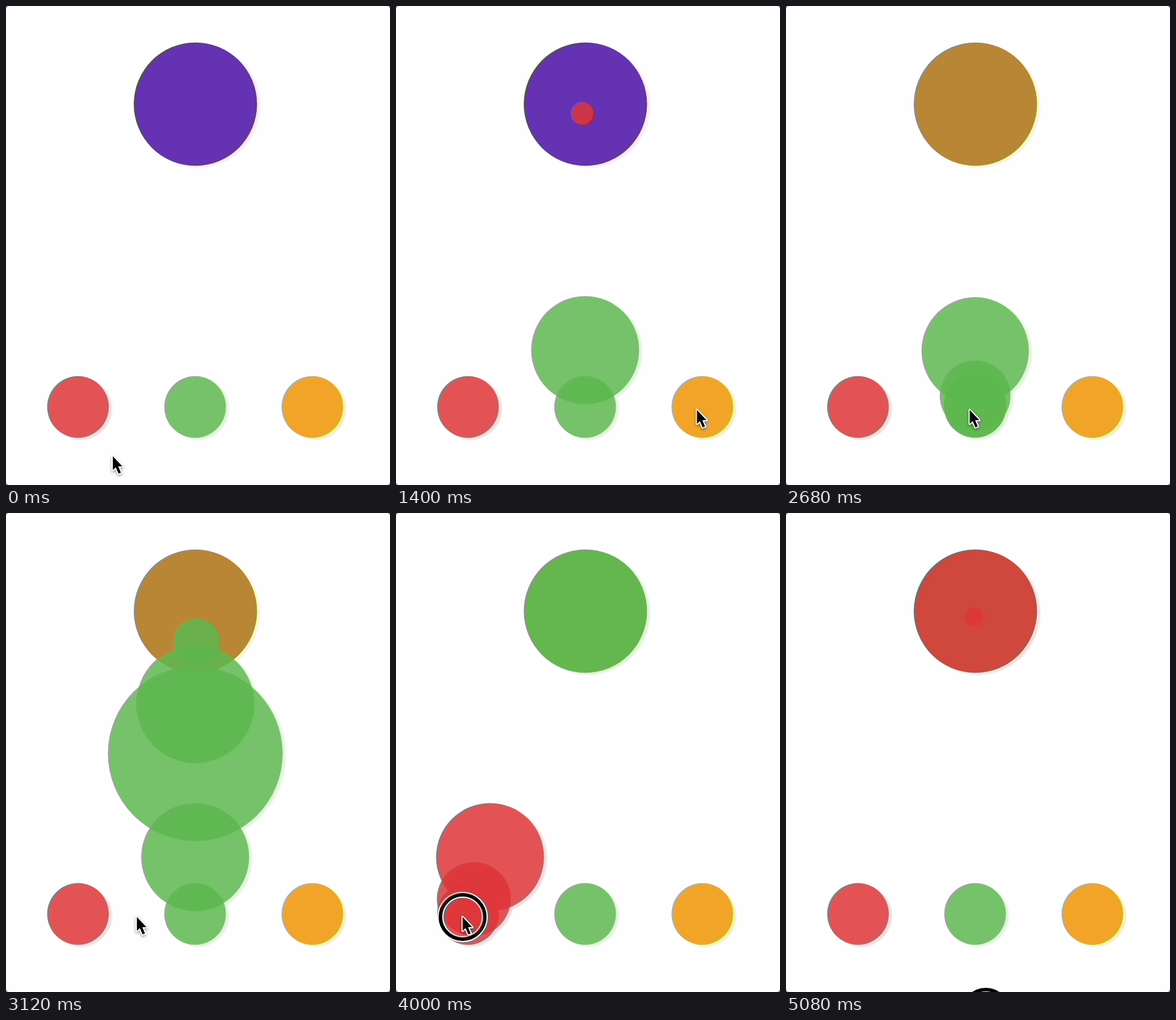
Recreate the animation shown at these times as an HTML page. Size 640 px wide and 798 px high, loop 5120 ms.

```html
<!DOCTYPE html>
<html>
<head>
<meta charset="utf-8">
<style>
  html, body { margin: 0; width: 100%; height: 100%; overflow: hidden; background: #777; }
  #stage { position: absolute; left: 0; top: 0; width: 640px; height: 798px; overflow: hidden; border-radius: 5px; }
  svg { position: absolute; left: -20px; top: -20px; }
</style>
</head>
<body>
<div id="stage">
  <svg width="680" height="838" viewBox="-20 -20 680 838">
    <!-- Brightness stays in place while the colour is shifted to the lower right. -->
    <filter id="colorShift" filterUnits="userSpaceOnUse" x="-20" y="-20" width="680" height="838"
      color-interpolation-filters="sRGB">
      <feColorMatrix in="SourceGraphic" result="luma"
        values=".299 .587 .114 0 0  .299 .587 .114 0 0  .299 .587 .114 0 0  0 0 0 1 0"/>
      <feColorMatrix in="SourceGraphic"
        values=".3505 -.2935 -.057 0 .5  -.1495 .2065 -.057 0 .5  -.1495 -.2935 .443 0 .5  0 0 0 1 0"/>
      <feGaussianBlur stdDeviation="1.5"/>
      <feOffset dx="4.5" dy="3" result="chroma"/>
      <feComposite in="luma" in2="chroma" operator="arithmetic" k2="1" k3="2" k4="-1.004"/>
    </filter>
    <g filter="url(#colorShift)">
      <rect x="-20" y="-20" width="680" height="838" fill="#fefefe"/>
      <g id="discs"></g>
      <g id="pointer">
        <g id="ring" fill="none">
          <circle r="37" stroke="#fff" stroke-width="10"/>
          <circle r="37" stroke="#000" stroke-width="6"/>
        </g>
        <path d="M0 0V23L5 18.5L9.5 29L13.5 27.5L9 17H16Z" stroke="#fff" stroke-width="4"
          paint-order="stroke" stroke-linejoin="round" style="filter:drop-shadow(0 2px 2px #0006)"/>
      </g>
    </g>
  </svg>
</div>
<script>
const LOOP = 5120, STEP = 40;
const FLIGHT = 930;            // travel time of a ball
const PRESS = 95, LEAD = 280;  // button held before release, pointer waiting before first tap
const ALPHA = 0.85, RADIUS = 51.4;
const PURPLE = [100, 50, 178];
const TARGET = { x: 315.7, y: 163.5 };

const makeButton = (x, color) => ({ x, y: 668, color });
const red = makeButton(120, [224, 55, 58]);
const green = makeButton(315.2, [94, 185, 80]);
const orange = makeButton(510.6, [241, 150, 4]);

const visit = (button, ...taps) => ({ x: button.x - 9, y: button.y + 5, taps, button });
const stops = [
  { x: 178, y: 750, taps: [0] },
  visit(red, 584),
  visit(green, 1115),
  visit(orange, 1683),
  visit(green, 2397, 2554, 2641, 2835),
  visit(red, 3715, 3854, 4059, 4238),
  { x: 150, y: 860, taps: [4840] },
  { x: 333, y: 831, taps: [5150] },
];

const discs = document.getElementById('discs');
const pointer = document.getElementById('pointer');
const ring = document.getElementById('ring');

function addDisc({ x, y }, r, color, alpha) {
  const el = document.createElementNS('http://www.w3.org/2000/svg', 'circle');
  discs.append(el);
  el.setAttribute('fill', `rgb(${color})`);
  el.setAttribute('fill-opacity', alpha);
  place(el, x, y, r);
  return el;
}

function place(el, x, y, r) {
  el.setAttribute('cx', x);
  el.setAttribute('cy', y);
  el.setAttribute('r', r);
}

const mixer = addDisc(TARGET, RADIUS * 2, PURPLE, 1);
for (const b of [red, green, orange]) addDisc(b, RADIUS, b.color, ALPHA);
const balls = stops.filter(s => s.button).flatMap(({ button, taps }) =>
  taps.map(at => ({ at, button, el: addDisc(button, RADIUS, button.color, ALPHA) })));

const clamp = v => Math.max(0, Math.min(1, v));
const lerp = (a, b, k) => a + (b - a) * k;
const easeInOut = u => u < 0.5 ? 2 * u * u : 1 - 2 * (1 - u) ** 2;
const show = (el, visible) => el.setAttribute('visibility', visible ? 'visible' : 'hidden');

function drawBalls(t) {
  let mixed = PURPLE;
  for (const { at, button, el } of balls) {
    const u = (t - at) / FLIGHT;
    show(el, u >= 0 && u < 1);
    const p = easeInOut(clamp(u));
    const scale = p < 0.5 ? lerp(1, 3, p * 2) : lerp(3, 0.2, p * 2 - 1);
    place(el, lerp(button.x, TARGET.x, p), lerp(button.y, TARGET.y, p), RADIUS * scale);
    // Every arriving ball blends half of its colour into the big disc.
    if (u >= 1) mixed = mixed.map((c, i) => (c + button.color[i]) / 2);
  }
  mixer.setAttribute('fill', `rgb(${mixed.map(Math.round)})`);
}

function drawPointer(t) {
  let { x, y } = stops[0];
  stops.slice(1).forEach((stop, i) => {
    const leave = stops[i].taps.at(-1), arrive = stop.taps[0] - LEAD;
    const k = easeInOut(clamp((t - leave) / (arrive - leave)));
    x = lerp(x, stop.x, k);
    y = lerp(y, stop.y, k);
  });
  pointer.setAttribute('transform', `translate(${x} ${y})`);
  show(ring, stops.some(s => s.taps.some(at => t >= at - PRESS && t < at)));
}

const start = performance.now();
function tick() {
  const t = Math.floor((performance.now() - start) % LOOP / STEP) * STEP;
  drawBalls(t);
  drawPointer(t);
  requestAnimationFrame(tick);
}
tick();
</script>
</body>
</html>
```
